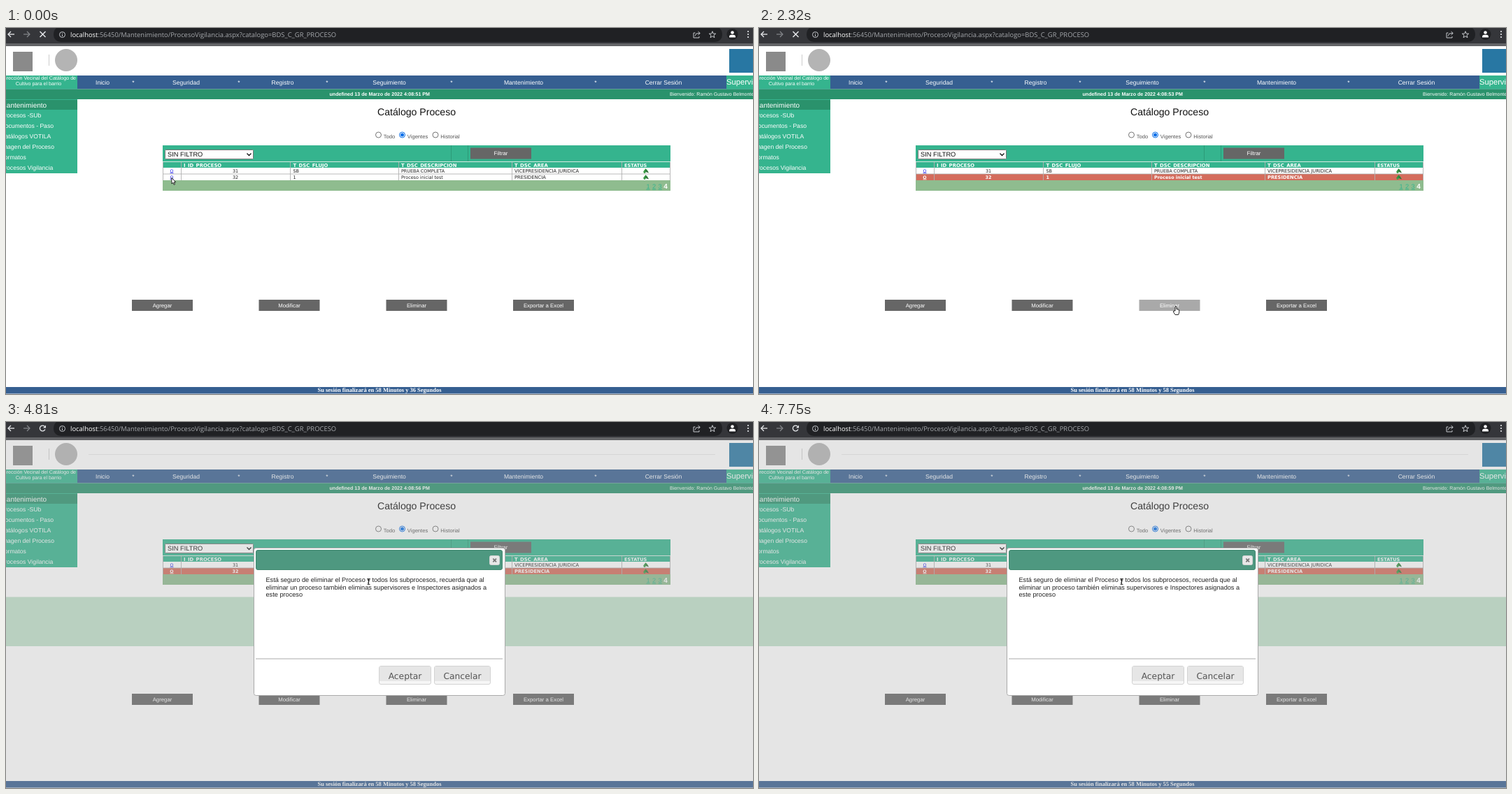
Animation, 1068 px wide and 524 px high, one loop 8 s. Source, as an HTML page with a canvas:

```html
<!DOCTYPE html>
<html lang="es">
<head>
<meta charset="utf-8">
<title>Catálogo Proceso</title>
<style>
  html, body { margin: 0; width: 100%; height: 100%; overflow: hidden; background: #fff; }
  canvas { display: block; }
</style>
</head>
<body>
<canvas id="stage" width="1068" height="524"></canvas>
<script>
const ctx = document.getElementById('stage').getContext('2d');
const W = 1068, H = 524, LOOP = 8000;
const ARIAL = '"Liberation Sans", Arial, sans-serif';
const VERDANA = '"DejaVu Sans", Verdana, sans-serif';
const TIMES = '"Liberation Serif", Times, serif';
const UI = '"Open Sans", "Noto Sans", sans-serif';
const GREEN = '#35b48e', DARK_GREEN = '#2a926c', BLUE = '#365f91', GRAY = '#666';

// Each list holds [start time, value...]; the last started entry is current.
const CLOCK = [[0, 51], [1340, 52], [2320, 53], [2850, 54], [3690, 55], [4810, 56], [5740, 57], [6820, 58], [7750, 59]];
const SESSION = [[0, 36], [250, 0], [1340, 59], [2320, 58], [2850, 0], [3690, 59], [4660, 58], [5740, 57], [6700, 56], [7750, 55]];
const POINTER = [
  [0, 'arrow', 236.5, 214], [830, 'arrow', 248, 219], [950, 'arrow', 345, 270], [1070, 'arrow', 480, 346],
  [1190, 'arrow', 576, 396], [1340, 'arrow', 592, 408], [1620, 'arrow', 592, 405.5], [1770, 'hand', 596, 398],
  [3690, 'arrow', 572, 340], [3815, 'arrow', 530, 255], [3940, 'arrow', 504, 197], [4090, 'arrow', 505, 207],
  [4210, 'beam', 506, 223.5], [4360, 'beam', 507, 223.5], [4510, 'beam', 518.5, 228.5]
];

const current = (list, t) => list.filter(e => e[0] <= t).pop();

function box(x, y, x2, y2, color) {
  ctx.fillStyle = color;
  ctx.fillRect(x, y, x2 - x, y2 - y);
}

function text(str, x, y, size, { font = ARIAL, color = '#fff', align = 'left', weight = 'normal' } = {}) {
  ctx.font = `${weight} ${size}px ${font}`;
  ctx.textAlign = align;
  ctx.fillStyle = color;
  ctx.fillText(str, x, y);
}

function line(points, color, width = 1) {
  ctx.beginPath();
  points.forEach(([x, y], i) => i ? ctx.lineTo(x, y) : ctx.moveTo(x, y));
  ctx.strokeStyle = color;
  ctx.lineWidth = width;
  ctx.stroke();
}

function disc(x, y, r, fill, stroke, width = 1) {
  ctx.beginPath();
  ctx.arc(x, y, r, 0, Math.PI * 2);
  paint(fill, stroke, width);
}

function panel(x, y, x2, y2, r, fill, stroke) {
  ctx.beginPath();
  ctx.roundRect(x, y, x2 - x, y2 - y, r);
  paint(fill, stroke, 1);
}

function shape(points, fill, stroke, width) {
  ctx.beginPath();
  points.forEach(p => ctx.lineTo(p[0], p[1]));
  ctx.closePath();
  paint(fill, stroke, width);
}

function paint(fill, stroke, width) {
  if (fill) { ctx.fillStyle = fill; ctx.fill(); }
  if (stroke) { ctx.strokeStyle = stroke; ctx.lineWidth = width; ctx.stroke(); }
}

function browserBar(loading) {
  const ink = '#e8eaed', soft = '#c4c7cb';
  box(0, 0, W, 22, '#35363a');
  box(0, 22, W, 26, '#636467');
  panel(68, -2, 1024, 20, 10, '#202124');
  line([[12, 9], [3, 9]], ink, 1.3);
  line([[7, 5], [3, 9], [7, 13]], ink, 1.3);
  line([[25, 9], [34, 9]], '#85888c', 1.2);
  line([[30, 5], [34, 9], [30, 13]], '#85888c', 1.2);
  if (loading) {
    line([[48.5, 5], [56.5, 13]], ink, 1.4);
    line([[56.5, 5], [48.5, 13]], ink, 1.4);
  } else {
    ctx.beginPath();
    ctx.arc(52.3, 9, 3.9, 0.4, 5.5);
    paint(null, ink, 1.3);
    shape([[57, 4.5], [57, 8.5], [53, 8.5]], ink);
  }
  disc(80.5, 9.5, 4, null, soft, 1);
  box(80, 9, 81, 12, soft);
  box(80, 7, 81, 8, soft);

  const host = 'localhost';
  text(host, 92, 13, 9.42, { font: UI });
  const w = ctx.measureText(host).width;
  text(':56450/Mantenimiento/ProcesoVigilancia.aspx?catalogo=BDS_C_GR_PROCESO', 92 + w, 13, 9.42, { font: UI, color: '#a5a8ac' });

  line([[985.5, 7], [983, 7], [983, 14], [991, 14], [991, 12]], soft);
  line([[985, 11.5], [987, 8], [992, 7.5]], soft);
  line([[989.5, 5], [992.3, 7.5], [989.5, 10]], soft);
  const star = [...Array(10).keys()].map(i => {
    const a = i * Math.PI / 5 - Math.PI / 2, r = i % 2 ? 2.1 : 5;
    return [1010 + r * Math.cos(a), 9.7 + r * Math.sin(a)];
  });
  shape(star, null, soft, 1);
  disc(1038.5, 9, 8, '#202124');
  disc(1038.5, 6.5, 2.3, '#fff');
  panel(1034, 9.7, 1043, 13.5, [3, 3, 0, 0], '#fff');
  [5, 9, 13].forEach(y => disc(1061, y, 1.1, ink));
}

function header(sec) {
  box(10, 34, 38, 62, '#8a8a8a');
  line([[61.5, 38], [61.5, 54]], '#ccc');
  disc(86, 46, 16, '#b4b4b4');
  box(1034, 30, 1068, 64, '#2877a3');

  box(0, 68, W, 87.5, BLUE);
  box(0, 87.5, W, 102, DARK_GREEN);
  box(0, 68, 102, 87.5, GREEN);
  box(1030, 68, W, 87.5, GREEN);
  const mid = { align: 'center' };
  text('Dirección Vecinal del Catálogo de', 47, 74, 7.1, mid);
  text('Cultivo para el barrio', 46.5, 81.7, 7.1, mid);
  [['Inicio', 138], ['Seguridad', 257.5], ['Registro', 395.5], ['Seguimiento', 548], ['Mantenimiento', 740], ['Cerrar Sesión', 940]]
    .forEach(([s, x]) => text(s, x, 80.7, 8.55, mid));
  [182, 333, 459, 637, 843].forEach(x => text('*', x, 80.7, 8.55, mid));
  text('Supervisor', 1030, 81, 11.2);
  text(`undefined 13 de Marzo de 2022 4:08:${sec} PM`, 462.5, 96.6, 7.1, { weight: 'bold' });
  text('Bienvenido: Ramón Gustavo Belmonte Soria', 949, 96.6, 6.98);
}

function sidebar() {
  box(0, 102, 102, 208, GREEN);
  box(0, 103, 102, 117, DARK_GREEN);
  text('Mantenimiento', -7.5, 113.7, 10);
  ['Procesos -SUb', 'Documentos - Paso', 'Catálogos VOTILA', 'Imagen del Proceso', 'Formatos', 'Procesos Vigilancia']
    .forEach((s, i) => text(s, -7.5, 128.2 + i * 14.95, 8.6));
}

function button(x, y, label, fill = GRAY) {
  box(x, y, x + 87, y + 16, fill);
  text(label, x + 43.5, y + 10.8, 7.8, { align: 'center' });
}

function statusIcon(y) {
  shape([[911, y + 1], [914.5, y - 3.5], [917, y - 1], [919, y + 2.5], [915, y + 1.5]], '#2f8f3c');
  disc(913, y + 1.8, 1.5, '#3f9e49');
  line([[915, y - 0.5], [918, y + 2.5]], '#444', 1);
}

function row(y, cells, chosen) {
  const color = chosen ? '#fff' : '#222';
  const style = { font: VERDANA, color, weight: chosen ? 'bold' : 'normal' };
  const base = y + 6.8;
  box(224, y, 950, y + 9, chosen ? '#d46c5c' : '#fff');
  const link = chosen ? '#fff' : '#1a1aee';
  text('O', 237, base, 6.2, { ...style, color: link, align: 'center' });
  line([[234.5, base + 1], [239.5, base + 1]], link, 0.8);
  text(cells[0], 328, base, 6.4, { ...style, align: 'center' });
  text(cells[1], 410.5, base, 6.4, style);
  text(cells[2], 565, base, 6.4, style);
  text(cells[3], 727, base, 6.7, style);
  statusIcon(y + 4.7);
}

function table(chosen) {
  box(224, 168, 950, 200, GREEN);
  [636.5, 660.5].forEach(x => line([[x, 168], [x, 191]], '#2c9b78'));
  box(224, 191, 950, 192, '#d5ebe2');
  panel(227.5, 174.5, 353.5, 187.5, 1, '#fff', '#767676');
  text('SIN FILTRO', 231, 184.4, 9.27, { color: '#111' });
  line([[344.5, 179.5], [347.5, 182.5], [350.5, 179.5]], '#111', 1.3);
  button(664, 171.5, 'Filtrar');

  const head = { font: VERDANA, weight: 'bold' };
  [['I_ID_PROCESO', 254], ['T_DSC_FLUJO', 410.5], ['T_DSC_DESCRIPCION', 565], ['T_DSC_AREA', 727], ['ESTATUS', 884]]
    .forEach(([s, x]) => text(s, x, 199, x > 800 ? 6.55 : 6.85, head));
  row(200, ['31', 'SB', 'PRUEBA COMPLETA', 'VICEPRESIDENCIA JURIDICA'], false);
  row(209, ['32', '1', 'Proceso inicial test', 'PRESIDENCIA'], chosen);
  line([[224, 209], [950, 209]], '#aaa', 0.8);
  [224.5, 250.5, 406.5, 561.5, 723.5, 880.5, 949.5].forEach(x => line([[x, 192], [x, 218]], '#b0b0b0', 0.9));

  box(224, 218, 950, 233, '#8fbc8f');
  ['1', '2', '3'].forEach((s, i) => {
    const x = 918 + i * 8.6;
    text(s, x, 230, 9.3, { color: GREEN, align: 'center' });
    line([[x - 2.6, 231.3], [x + 2.6, 231.3]], GREEN, 0.8);
  });
  text('4', 943, 230, 10, { align: 'center', weight: 'bold' });
}

function content(chosen, hover) {
  text('Catálogo Proceso', 587, 124.7, 14.1, { color: '#111', align: 'center' });
  [['Todo', 532.5], ['Vigentes', 566.5], ['Historial', 614]].forEach(([s, x], i) => {
    const on = i === 1;
    disc(x, 153, 4, '#fff', on ? '#0a6fe8' : '#767676', 1);
    if (on) disc(x, 153, 2.5, '#0a6fe8');
    text(s, x + 7.3, 158, 7.6, { color: '#555' });
  });
  table(chosen);
  button(180, 389, 'Agregar');
  button(361.5, 389, 'Modificar');
  button(543.5, 389, 'Eliminar', hover ? '#a9a9a9' : GRAY);
  button(725, 389, 'Exportar a Excel');
}

function footer(left) {
  box(0, 514, W, 523.5, BLUE);
  if (left) text(`Su sesión finalizará en 58 Minutos y ${left} Segundos`, 445.5, 521.4, 8.47, { font: TIMES, weight: 'bold' });
}

function dialogButton(x, x2, label) {
  panel(x, 349.5, x2, 375.5, 2.5, '#f6f6f6', '#d3d3d3');
  box(x + 0.5, 350, x2 - 0.5, 371, '#e6e6e6');
  text(label, (x + x2) / 2, 367.5, 12.3, { font: VERDANA, color: '#555', align: 'center' });
}

function dialog() {
  ctx.fillStyle = 'rgba(170, 170, 170, 0.3)';
  ctx.fillRect(0, 26, W, H - 26);
  box(118, 46, 1014, 47, '#d6d6d6');
  box(0, 250.5, W, 321, '#b9d0c0');

  panel(354.5, 180.5, 713.5, 391.5, 3, '#fff', '#aaa');
  panel(357.5, 183.5, 709.5, 211.5, 2.5, '#4e9880', '#438a72');
  panel(691.5, 191.5, 705.5, 204.5, 2, '#e8e8e8', '#d3d3d3');
  line([[696.3, 195.7], [701, 200.3]], '#777', 1.8);
  line([[701, 195.7], [696.3, 200.3]], '#777', 1.8);
  ['Está seguro de eliminar el Proceso y todos los subprocesos, recuerda que al',
    'eliminar un proceso también eliminas supervisores e Inspectores asignados a',
    'este proceso'].forEach((s, i) => text(s, 371.5, 229 + i * 10.6, 9.18, { color: '#222' }));
  line([[357, 339], [710, 339]], '#aaa');
  dialogButton(533.5, 607.5, 'Aceptar');
  dialogButton(612.5, 692.5, 'Cancelar');
}

function pointer(kind, x, y) {
  ctx.save();
  ctx.translate(x, y);
  ctx.lineJoin = 'round';
  if (kind === 'arrow') {
    shape([[0.4, 0.4], [0.4, 9], [2.3, 7.3], [3.6, 10.4], [5, 9.8], [3.7, 6.8], [6.2, 6.7]], '#fff', '#111', 0.9);
  } else if (kind === 'hand') {
    shape([[-1, 7], [-1, 1], [0, 0.3], [1, 1], [1, 4.5], [3, 4.9], [4.6, 5.6], [4.8, 9], [3.6, 12.5],
      [-1, 12.5], [-3.8, 8], [-3, 7]], '#fff', '#111', 0.9);
  } else {
    line([[0, -4], [0, 4]], '#111', 0.9);
    line([[-2, -4], [2, -4]], '#111', 0.8);
    line([[-2, 4], [2, 4]], '#111', 0.8);
  }
  ctx.restore();
}

function draw(t) {
  const open = t >= 2850;
  ctx.textRendering = 'geometricPrecision';
  box(0, 0, W, H, '#fff');
  header(current(CLOCK, t)[1]);
  sidebar();
  content(t >= 250, t >= 1770 && !open);
  footer(current(SESSION, t)[1]);
  if (open) dialog();
  browserBar(t < 400 || (t >= 2040 && !open));
  const [, kind, x, y] = current(POINTER, t);
  pointer(kind, x, y);
}

const start = performance.now();
function tick() {
  draw((performance.now() - start) % LOOP);
  requestAnimationFrame(tick);
}
tick();
</script>
</body>
</html>
```
